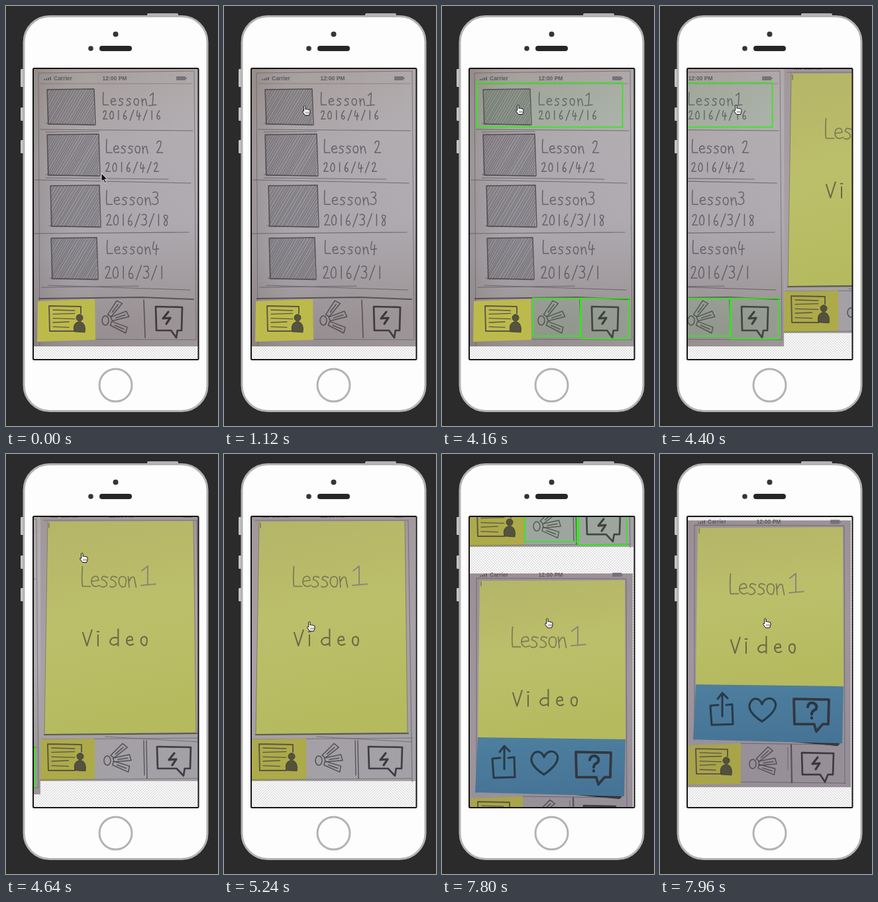
These frames come from a looping animation (320x633 px, 8000 ms). An HTML page:

```html
<!DOCTYPE html>
<html lang="en">
<head>
<meta charset="utf-8">
<title>Paper prototype</title>
<style>
  html, body { margin: 0; width: 100%; height: 100%; overflow: hidden; background: #2b2b2b; }
  svg { display: block; width: 100vw; height: 100vh; }
  .ink { fill: none; stroke-linecap: round; stroke-linejoin: round; }
  .hot { fill: #30ff30; fill-opacity: .06; stroke: #35e81c; stroke-width: 1.8; }
  text { font-family: "Liberation Sans", Arial, sans-serif; font-weight: bold; font-size: 8.5px; fill: #5f5a5e; }
</style>
</head>
<body>
<svg id="stage" viewBox="0 0 320 633" preserveAspectRatio="none"></svg>
<script>
const LOOP = 8000, STEP = 40, SCREEN_W = 248, SCREEN_H = 439;

// Pencil lettering: strokes in a 10 x 20 cell standing on the baseline
const GLYPHS = {
  L: 'M1-21Q0-8 1-1L9-1',
  e: 'M1-6L8-7Q8-12 4-11Q0-10 1-4Q3 1 9-2',
  s: 'M8-10Q2-13 2-8Q8-6 7-2Q4 1 1-1',
  o: 'M5-11Q0-11 1-4Q3 1 7-1Q10-10 5-11',
  n: 'M1-11L2 0M2-6Q4-12 7-10L9 0',
  v: 'M0-16L5 0L11-19',
  i: 'M1-13L1 0M0-17L2-17',
  d: 'M8-20L8 0M8-9Q0-12-2-5Q0 2 8-3',
  I: 'M2-16L7-20L6-1M0 0L12-1',
  0: 'M5-18Q0-14 1-5Q3 2 8-3Q10-16 5-18',
  1: 'M5-19L5 0',
  2: 'M1-15Q3-20 7-18Q9-13 1-1L10-1',
  3: 'M1-18Q9-21 8-14Q7-11 4-11Q10-10 8-3Q5 1 0-2',
  4: 'M3-19Q0-8 2-7L10-8M7-14L6 1',
  6: 'M7-19Q0-10 2-3Q5 2 8-3Q8-10 2-7',
  8: 'M8-16Q3-20 2-15Q3-11 7-8Q9 0 4 0Q0-3 5-9Q9-14 8-16',
  '/': 'M9-20L1 2'
};

let seed = 7;
const random = () => (seed = seed * 16807 % 2147483647) / 2147483647;

const stroke = (d, width = 1, color = '#4a464a', opacity = .85) =>
  `<path class="ink" d="${d}" stroke="${color}" stroke-width="${width}" opacity="${opacity}"/>`;
const box = (x, y, w, h, fill, extra = '') =>
  `<rect x="${x}" y="${y}" width="${w}" height="${h}" fill="${fill}" ${extra}/>`;
const poly = (points, fill) => `<polygon points="${points}" fill="${fill}"/>`;
const hot = (x, y, w, h) => `<rect class="hot" x="${x}" y="${y}" width="${w}" height="${h}"/>`;

function letter(word, x, y, size, pitch, width = 1.5, color = '#55505a') {
  const k = size / 20;
  const marks = [...word].map((c, i) => c === ' ' ? '' :
    `<path d="${GLYPHS[c]}" transform="translate(${x + i * pitch} ${y}) scale(${k})"/>`).join('');
  return `<g class="ink" role="img" aria-label="${word.replace('I', '1')}" stroke="${color}" stroke-width="${width / k}" opacity=".8">${marks}</g>`;
}

function thumb(x, y, w, h) {
  let lines = '';
  for (let a = 3; a < w + h * .6; a += 2.6 + random() * 2.4) {
    const top = Math.max(0, (a - w) / .6), bottom = Math.min(h, a / .6);
    lines += `M${x + a - top * .6} ${y + top}L${x + a - bottom * .6 + random()} ${y + bottom}`;
  }
  const edge = `M${x} ${y + 1}L${x + w} ${y}L${x + w + 2} ${y + h}L${x + 2} ${y + h - 1}Z`;
  return box(x, y, w, h, '#77737b', 'opacity=".45"') + stroke(lines, 1, '#4d4a52', .5) +
    stroke(edge, 1.5) + stroke(`M${x - 2} ${y + h - 2}L${x + w + 1} ${y + h + 1}`, 1, '#4a464a', .5);
}

function card(x, y, w, h) {
  let lines = '';
  for (let i = 0; i < 5; i++)
    lines += `M${x + 6} ${y + 6 + i * h / 6}l${w * (i < 3 ? .68 : .5)} ${i % 2 ? -1 : 1}`;
  const px = x + w - 2, py = y + h * .47;
  return stroke(`M${x} ${y}L${x + w} ${y + 1}V${y + h * .3}M${x} ${y}L${x + 1} ${y + h}H${x + w - 10}`, 1.9) +
    stroke(lines, 1.3) +
    `<g fill="#45423c" stroke="#333" opacity=".85"><circle cx="${px}" cy="${py}" r="5"/>
     <path d="M${px - 8} ${py + 21}Q${px - 11} ${py + 9} ${px - 2} ${py + 6}H${px + 2}Q${px + 10} ${py + 9} ${px + 8} ${py + 22}Z"/></g>`;
}

// A loose fan of three cards held at one oval
const fan = (x, y, angles) =>
  `<g class="ink" stroke="#474449" stroke-width="1.5" opacity=".85" transform="translate(${x} ${y})">
   <ellipse rx="5" ry="7"/>` + angles.map(a =>
  `<g transform="rotate(${a})"><path d="M9-3L34-6L36 3L10 3ZM16 0L31-1"/></g>`).join('') + '</g>';

const bubble = (x, y, w, h, tail, width = 2.7) =>
  stroke(`M${x} ${y}L${x + w} ${y + 1}L${x + w - 1} ${y + h}H${x + w * .82}L${x + tail} ${y + h + 11}L${x + w * .58} ${y + h}H${x + 1}Z`, width, '#2f2c31');
const bolt = (x, y) => stroke(`M${x + 2} ${y - 9}L${x - 6} ${y + 1}L${x + 5} ${y}L${x - 1} ${y + 9}`, 3.2, '#2b282c');

const statusBar = y =>
  [0, 1, 2, 3].map(i => box(57 + i * 3, y - 2 - i, 2, 2 + i, '#666066')).join('') +
  `<text x="72" y="${y}">Carrier</text><text x="164" y="${y}" text-anchor="middle">12:00 PM</text>` +
  box(257, y - 6, 14, 6, '#77717a', 'rx="1"') + box(271, y - 4, 2, 2, '#77717a');

function lessonList() {
  const rows = [
    ['LessonI', 146, 150, 19, 11.6, '2016/4/16', 146, 171, 14, 10.1],
    ['Lesson 2', 151, 222, 20, 10.8, '2016/4/2', 150, 250, 15, 10.4],
    ['Lesson3', 151, 300, 21, 11.6, '2016/3/18', 151, 331, 18, 10.7],
    ['Lesson4', 152, 374, 20, 11.4, '2016/3/1', 149, 411, 20, 11.6]
  ];
  return box(42, 94, 248, 419, 'url(#paperA)') + box(42, 94, 248, 419, 'url(#shade)') +
    stroke('M51 512L49 101L284 98L287 503L48 502', 1, '#5a545a', .6) +
    statusBar(112) + stroke('M52 117H281', .8, '#5a545a', .5) +
    thumb(62, 125, 71, 54) + thumb(62, 193, 78, 63) + thumb(67, 270, 74, 63) + thumb(68, 349, 69, 63) +
    stroke('M52 186L282 188M60 190L140 189M44 262L279 267M60 259L245 261M42 343L276 341M64 421L278 428M54 424L200 422', 1.1, '#555056', .7) +
    rows.map(r => letter(...r.slice(0, 5)) + letter(...r.slice(5))).join('') +
    stroke('M50 441L205 439L283 442', 2, '#403c40', .75) +
    poly('48,445 134,442 135,503 47,506', '#bdba4c') +
    card(65, 452, 48, 38) + fan(150, 474, [-50, -14, 27]) +
    stroke('M208 443L210 500', 1.6) + bubble(226, 453, 40, 36, 31) + bolt(243, 470) +
    `<g id="hotList">${hot(53, 115.5, 219.5, 67)}${hot(137, 440.5, 72, 57)}${hot(210, 440.5, 72, 61)}</g>`;
}

const videoTitle = (x, lessonY, videoY) =>
  letter('Lesson', x, lessonY, 30, 13.8, 1.7, '#6a684e') +
  `<g transform="translate(${x + 90} ${lessonY - 3})">` +
  stroke('M1-22L10-29L10-2M0 0L22-2', 2, '#807a78', .8) + '</g>' +
  letter('video', x + 2, videoY, 25, 21.7, 2.1, '#58553f');

function videoPage() {
  return box(42, 94, 247, 399, 'url(#paperB)') +
    statusBar(96) + stroke('M47 100H278L284 494', 1.2, '#5c565f', .6) +
    poly('53,102 273,101 277,419 48,422', 'url(#sticky)') +
    stroke('M48 423L278 421', 2.2, '#4d4936', .8) + stroke('M53 102L48 422M273 101L277 419', 1, '#66614c', .6) +
    stroke('M55 104v7', 1) +
    stroke('M44 430L285 428M140 426L284 434', 1, '#555', .6) +
    poly('43,430 124,429 124,490 42,492', '#adaa49') +
    card(53, 437, 51, 40) + fan(143, 462, [-38, -5, 24]) +
    stroke('M198 432L199 484M202 432L203 489', 1.4) + bubble(218, 441, 51, 33, 40) + bolt(242, 460) +
    stroke('M42 491L284 489', 1, '#555', .6) +
    `<g id="hotVideo">${hot(52, 100, 229, 322)}${hot(125, 429, 79, 56)}${hot(206, 429, 73, 61)}</g>`;
}

function sharePage() {
  return box(42, 94, 246, 402, 'url(#paperC)') +
    statusBar(99) + stroke('M52 425V101L278 102L279 490', 1.1, '#5c565f', .6) +
    poly('57,105 276,104 277,346 54,346', 'url(#sticky)') + stroke('M59 106v7', 1) +
    videoTitle(105, 206, 294) +
    poly('170,425 273,428 268,434', '#302e30') +
    poly('54,341 277,344 275,430 50,424', 'url(#panel)') +
    stroke('M88 372L76 373L78 402L110 401L109 371L100 372M94 389V354M87 363L94 354L102 362', 3, '#25333f', .9) +
    stroke('M154 397C140 388 132 378 136 369C141 359 151 362 154 371C158 361 169 359 174 368C178 379 164 390 154 397Z', 3.2, '#25333f', .9) +
    bubble(202, 363, 53, 38, 34, 3.8) +
    stroke('M223 375Q224 368 231 369Q239 372 235 379Q229 381 229 386M229 391v1', 4, '#222a33') +
    poly('43,433 122,430 122,491 42,492', '#a8a449') +
    card(54, 438, 48, 38) + fan(140, 461, [-38, -5, 22]) +
    stroke('M122 430L272 432M122 488L280 490M193 436V470', 1, '#555', .7) + stroke('M198 432L199 489', 2.2) +
    bubble(214, 444, 48, 33, 35) + bolt(236, 460);
}

const gradient = (id, ...colors) => `<linearGradient id="${id}" x2=".15" y2="1">` +
  colors.map((c, i) => `<stop offset="${i / (colors.length - 1)}" stop-color="${c}"/>`).join('') + '</linearGradient>';

document.getElementById('stage').innerHTML = `
<defs>
  ${gradient('paperA', '#a39a97', '#aaa5a9', '#a6a2a8', '#928a8c')}
  ${gradient('paperB', '#a0979b', '#a8a0a6', '#a3a0a6')}
  ${gradient('paperC', '#9a8f95', '#a0969e', '#968f97')}
  ${gradient('sticky', '#b5b568', '#bcbf6a', '#b5ba5f')}
  ${gradient('panel', '#4e7f9f', '#467496')}
  <linearGradient id="shade"><stop stop-color="#5b514b" stop-opacity=".2"/><stop offset=".4" stop-color="#fff" stop-opacity=".04"/><stop offset="1" stop-color="#fff" stop-opacity=".1"/></linearGradient>
  <pattern id="checks" width="4" height="4" patternUnits="userSpaceOnUse">
    ${box(0, 0, 4, 4, '#fafafa') + box(0, 0, 2, 2, '#e2e2e2') + box(2, 2, 2, 2, '#e2e2e2')}
  </pattern>
  <clipPath id="screen"><rect x="41" y="94" width="249" height="439"/></clipPath>
</defs>
${box(0, 0, 320, 633, '#2b2b2b')}
${box(213, 11, 47, 6, '#b4b4b4', 'rx="2"')}
${[[95, 27], [153, 20], [202, 20]].map(([y, h]) => box(22, y, 5, h, '#c4c4c4', 'rx="1"')).join('')}
<rect x="27" y="15.5" width="277" height="595" rx="39" fill="#fdfdfd" stroke="#b3b3b5" stroke-width="3"/>
<circle cx="165.5" cy="42.5" r="4" fill="#353535"/><circle cx="128" cy="64" r="3.8" fill="#353535"/>
${box(141, 60, 49, 8, '#262626', 'rx="4"')}
<circle cx="165.5" cy="571.5" r="24.5" fill="#fdfdfd" stroke="#b3b3b5" stroke-width="3"/>
<g clip-path="url(#screen)">
  ${box(41, 94, 250, 440, 'url(#checks)')}
  <g id="list">${lessonList()}</g>
  <g id="video">${videoPage()}${videoTitle(104, 201, 289)}</g>
  <g id="share">${sharePage()}</g>
</g>
<rect x="41" y="94" width="249.5" height="439" rx="1.5" fill="none" stroke="#151515" stroke-width="2"/>
<g id="cursor" stroke-linejoin="round">
  <path id="arrow" d="M0 0V12.5L3 10L5.2 15L7.2 14L5 9.3H9Z" fill="#111" stroke="#fff" stroke-width=".8"/>
  <g id="hand"><path d="M2.5 1.5Q3.8 0 5 1.5V6Q6.5 4.8 7.5 6.2Q9 5.2 10 6.7Q12 6 12 8V11L10.5 15H4.5L.5 9.5Q.5 7.5 2.8 8.8Z" fill="#fff" stroke="#111"/>
  <path d="M6 9.5v3M8 9.5v3M10 9.5v3" stroke="#333" stroke-width=".7"/></g>
</g>`;

// Rows of [time, value, value...], linear between rows
const slideLeft = [[4280, 0], [4320, .08], [4360, .24], [4400, .415], [4480, .7], [4560, .87], [4640, .96], [4760, 1]];
const slideUp = [[7640, 0], [7680, .3], [7720, .53], [7760, .69], [7800, .804], [7880, .93], [7960, .986]];
const pointer = [
  [0, 144, 252], [160, 145, 267], [320, 142, 255], [600, 131, 206], [840, 119, 170],
  [880, 119, 170], [1100, 118, 151], [1280, 117, 140], [2680, 117, 140], [2720, 116, 142], [2840, 112, 148],
  [3240, 112, 148], [3320, 111, 148.5], [4720, 111, 148.5], [4920, 115, 176], [5120, 122, 216],
  [5240, 125, 252], [5600, 134, 352], [5960, 140, 411], [6120, 145, 428], [6360, 151, 385],
  [6640, 158, 306], [6760, 158, 323], [6800, 158, 322], [7000, 157, 280], [7200, 155, 247]
];

function sample(table, t) {
  const next = table.findIndex(row => row[0] > t);
  if (next === 0) return table[0].slice(1);
  if (next < 0) return table.at(-1).slice(1);
  const a = table[next - 1], b = table[next], p = (t - a[0]) / (b[0] - a[0]);
  return a.slice(1).map((v, i) => v + (b[i + 1] - v) * p);
}

const el = Object.fromEntries([...document.querySelectorAll('#stage g[id], #arrow')].map(n => [n.id, n]));
const move = (node, x, y) => node.setAttribute('transform', `translate(${x.toFixed(2)} ${y.toFixed(2)})`);
const show = (node, on) => node.style.display = on ? '' : 'none';

function draw(now) {
  const t = Math.floor(now % LOOP / STEP) * STEP;
  const [left] = sample(slideLeft, t), [up] = sample(slideUp, t), [x, y] = sample(pointer, t);
  move(el.list, -left * SCREEN_W, 0);
  move(el.video, (1 - left) * SCREEN_W, -up * SCREEN_H);
  move(el.share, 0, (1 - up) * SCREEN_H);
  move(el.cursor, x, y);
  show(el.list, left < 1);
  show(el.video, left > 0);
  show(el.share, up > 0);
  show(el.hotList, t >= 4160);
  show(el.hotVideo, t >= 7480);
  const overLink = t >= 4160 || y < 180;
  show(el.hand, overLink);
  show(el.arrow, !overLink);
}

const start = performance.now();
function tick() {
  draw(performance.now() - start);
  requestAnimationFrame(tick);
}
tick();
</script>
</body>
</html>
```
